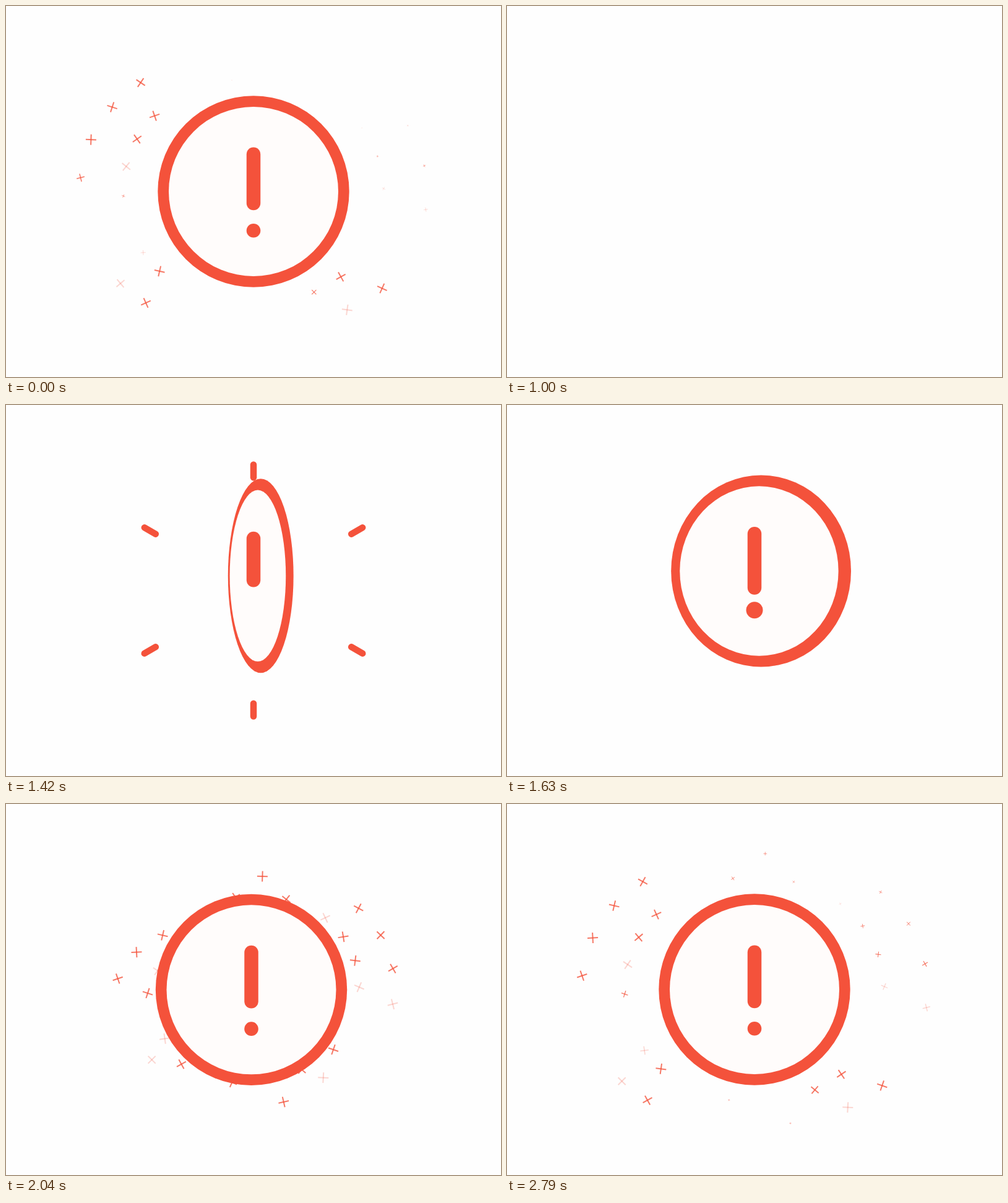
An HTML page with a canvas that plays this animation: 800 by 600 pixels, repeating every 2.83 s.

```html
<!DOCTYPE html>
<html>
<head>
<meta charset="utf-8">
<style>
html, body { margin: 0; width: 100%; height: 100%; overflow: hidden; background: #fefefe; }
canvas { display: block; }
</style>
</head>
<body>
<canvas id="stage" width="800" height="600"></canvas>
<script>
const ctx = document.getElementById('stage').getContext('2d');
const RED = '#f4523b', PALE = '#fffcfb';
const LOOP = 2830, FPS = 24, COUNT = 68;
const RAD = Math.PI / 180;

// Arcs of sparks: first and last bearing, how many, and how much later each one vanishes.
const arcs = [
  { from: 45, to: -6, n: 8, lag: 0.2 },
  { from: 70, to: 101, n: 3, lag: 0.2 },
  { from: 182, to: 136, n: 8, lag: 1.35 },
  { from: 209, to: 226, n: 4, lag: 1.8 },
  { from: 257, to: 285, n: 2, lag: 0 },
  { from: 301, to: 323, n: 4, lag: 2.2 }
];

// Sparks alternate between a round inner ring and a wider outer one.
const sparks = arcs.flatMap(({ from, to, n, lag }) => Array.from({ length: n }, (_, j) => {
  const a = (from + (to - from) * j / (n - 1)) * RAD, wide = Math.cos(2 * a);
  return {
    x: Math.cos(a), y: -Math.sin(a),
    r: j % 2 ? 250 + 30 * wide : 196 + 14 * wide,
    end: 67.6 + lag * (j + 1)
  };
}));

const clamp = v => Math.max(0, Math.min(1, v));

// Smooth interpolation through [tick, value] pairs.
function keys(f, ...pts) {
  if (f <= pts[0][0]) return pts[0][1];
  for (let i = 1; i < pts.length; i++) {
    const [a, u] = pts[i - 1], [b, v] = pts[i];
    if (f < b) {
      const p = (f - a) / (b - a);
      return u + (v - u) * p * p * (3 - 2 * p);
    }
  }
  return pts[pts.length - 1][1];
}

function line(x1, y1, x2, y2, width, cap) {
  ctx.lineWidth = width;
  ctx.lineCap = cap;
  ctx.beginPath();
  ctx.moveTo(x1, y1);
  ctx.lineTo(x2, y2);
  ctx.stroke();
}

function oval(x, y, rx, ry, color) {
  ctx.fillStyle = color;
  ctx.beginPath();
  ctx.ellipse(x, y, rx, ry, 0, 0, 2 * Math.PI);
  ctx.fill();
}

function drawSparks(f) {
  const left = (end, at) => Math.max(0, (end + 6.5 - at) / 46) ** 3;
  sparks.forEach(({ x, y, r, end }, i) => {
    const size = clamp((f - 38.5) / 3) * clamp((end - f) / 3);
    if (!size) return;
    const d = r * (1 - left(end, f)) / (1 - left(end, 67));
    ctx.save();
    ctx.globalAlpha = (i + 0.5) % 6.5 < 1.5 ? 0.23 : 0.78;
    ctx.translate(400 + x * d, 300 + y * d);
    ctx.rotate((i * 53 + f * 5) * RAD);
    ctx.scale(size, size);
    line(-8.5, 0, 8.5, 0, 2, 'butt');
    line(0, -8.5, 0, 8.5, 2, 'butt');
    ctx.restore();
  });
}

function drawBurst(f) {
  const p = (f - 30) / 8;
  if (p <= 0 || p >= 1) return;
  const tip = 100 + 138 * (1 - (1 - p) ** 2), tail = 100 + 138 * p ** 0.74;
  for (let i = 0; i < 6; i++) {
    const a = (i * 60 + 30) * RAD, c = Math.cos(a), s = Math.sin(a);
    line(400 + tail * c, 300 + tail * s, 400 + tip * c, 300 + tip * s,
      10.5 * Math.min(1, 4 * (1 - p)), 'round');
  }
}

function badgeY(f) {
  if (f < 25) return 300 + 470 * clamp((f - 13) / 11) ** 3;
  if (f < 37) return 255 + 515 * ((37 - f) / 12) ** 2.3;
  if (f < 47) return keys(f, [37, 255], [42.5, 300]);
  return 300 + 1.2 * Math.sin(Math.PI * clamp((f - 47) / 20));
}

// Disc turning about its vertical axis, seen in perspective.
function disc(x, y, r, turn, edge, color) {
  const s = Math.sin(turn), c = Math.cos(turn), k = 1 - (r * s / 850) ** 2;
  oval(x + r * r * s * c / 850 / k + 2 * edge * s, y,
    r * Math.abs(c) / k + edge * Math.abs(s), r / Math.sqrt(k), color);
}

function drawBadge(f) {
  if (f >= 24 && f < 26) return;
  const entering = f >= 26;
  const y = badgeY(f);
  const shake = f > 44 && f < 54 ? 7 * Math.sin((f - 44) * 0.3 * Math.PI) * (54 - f) / 10 : 0;
  const x = 400 + shake;
  const turn = entering && f < 45 ? 0.588 * (45 - f) ** 2 * RAD : 0;
  disc(x, y, 154.7, turn, 1.5, RED);
  disc(x, y, 137, turn, 0, PALE);

  if (!entering || f > 30) {
    const end = entering ? keys(f, [30, -60], [34, 7], [39, 27], [43, 19]) : 19;
    line(x, y - 60.3, x, y + end, 22.5, 'round');
  }
  const dot = entering ? keys(f, [35, 0], [39, 13.5], [43, 11.3]) : 11.3;
  oval(x, y + 63.3, dot, dot, RED);
}

function draw(now) {
  const f = Math.floor((now % LOOP) * FPS / 1000 + 0.1) % COUNT;
  ctx.clearRect(0, 0, 800, 600);
  ctx.strokeStyle = RED;
  drawSparks(f < 12 ? f + COUNT : f);
  drawBurst(f);
  drawBadge(f);
}

let start;
function tick(now) {
  start ??= now;
  draw(now - start);
  requestAnimationFrame(tick);
}
draw(0);
requestAnimationFrame(tick);
</script>
</body>
</html>
```
